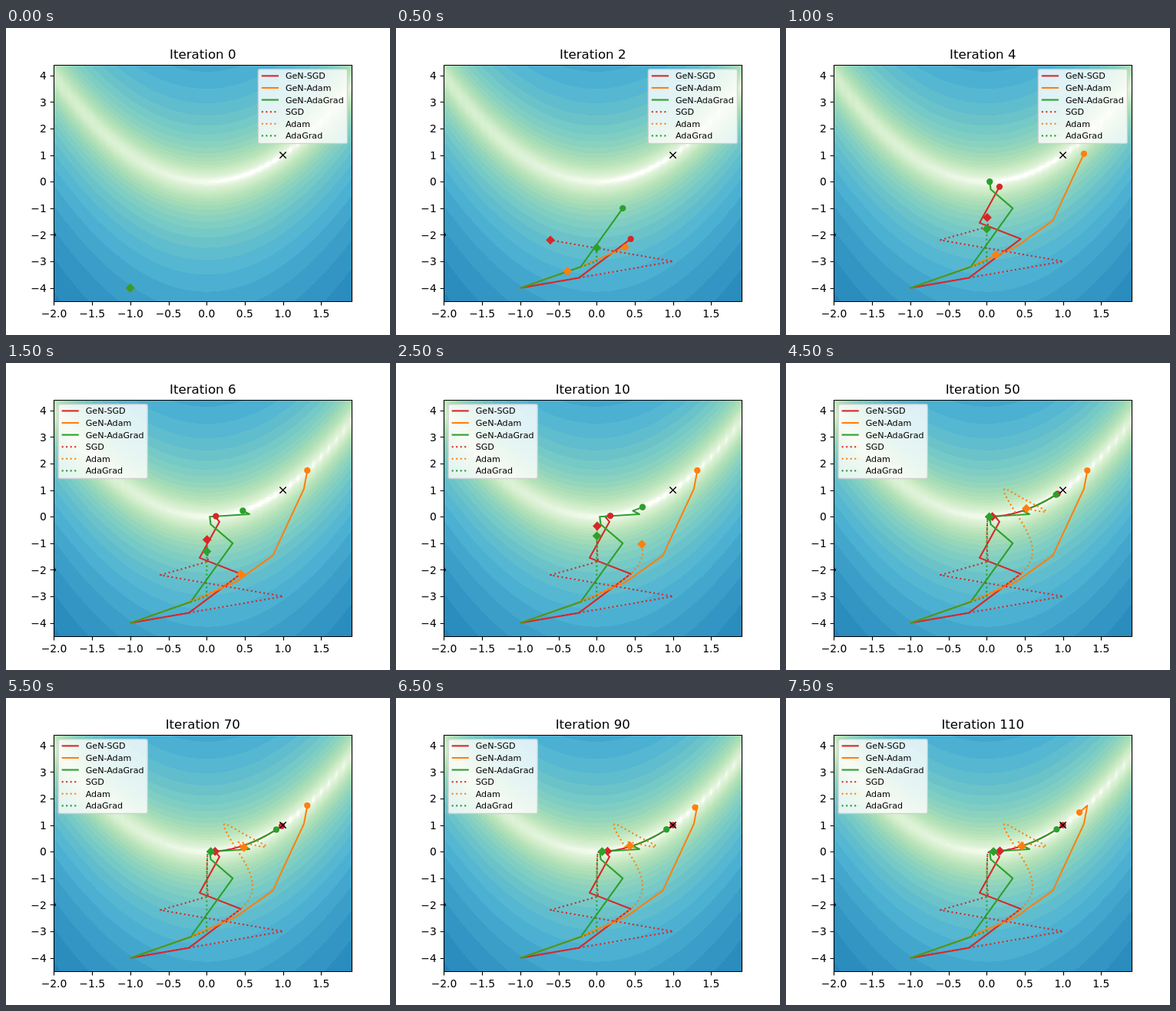
An HTML page with a canvas for the animation above (8 s loop, 500 by 400 pixels).

```html
<!DOCTYPE html>
<html lang="en">
<head>
<meta charset="utf-8">
<title>Optimizer paths</title>
<style>
html, body { margin: 0; width: 100%; height: 100%; overflow: hidden; background: #fff; }
canvas { display: block; }
</style>
</head>
<body>
<canvas id="stage" width="500" height="400"></canvas>
<script>
const RED = '#d62728', ORANGE = '#ff7f0e', GREEN = '#2ca02c';
const LEFT = 62.5, RIGHT = 450, TOP = 48, BOTTOM = 356;
const SX = (RIGHT - LEFT) / 3.9, SY = (BOTTOM - TOP) / 8.9;
const LAST = 110, STEP_MS = 500, STEPS = 16;
const FONT = '"DejaVu Sans", Verdana, sans-serif';

const px = x => LEFT + (x + 2) * SX;
const py = y => BOTTOM - (y + 4.5) * SY;

// Rosenbrock function, its gradient and curvature along p
const loss = (x, y) => (1 - x) ** 2 + 100 * (y - x * x) ** 2;
const grad = ([x, y]) => [-400 * x * (y - x * x) - 2 * (1 - x), 200 * (y - x * x)];
const curvature = ([x, y], [a, b]) =>
  (1200 * x * x - 400 * y + 2) * a * a - 800 * x * a * b + 200 * b * b;

// Each factory returns a function from gradient to update direction
const sgd = () => g => g;
const adagrad = () => {
  const sum = [0, 0];
  return g => g.map((v, i) => v / Math.sqrt(sum[i] += v * v));
};
const adam = () => {
  const m = [0, 0], s = [0, 0];
  let t = 0;
  return g => {
    t++;
    return g.map((v, i) => {
      m[i] = 0.9 * m[i] + 0.1 * v;
      s[i] = 0.999 * s[i] + 0.001 * v * v;
      return m[i] / (1 - 0.9 ** t) / (Math.sqrt(s[i] / (1 - 0.999 ** t)) + 1e-8);
    });
  };
};

// Without a rate, the step length is Newton's along the direction
function descend(direction, steps, rate) {
  const path = [[-1, -4]];
  for (let n = 0; n < steps; n++) {
    const p = path[n], g = grad(p), d = direction(g);
    const r = rate || (g[0] * d[0] + g[1] * d[1]) / curvature(p, d);
    path.push([p[0] - r * d[0], p[1] - r * d[1]]);
  }
  return path;
}

// Continue along the valley y = x², through [iteration, x] keys
function followValley(path, keys) {
  for (const [end, x1] of keys) {
    const start = path.length - 1, x0 = path[start][0];
    for (let n = start + 1; n <= end; n++) {
      const x = x0 + (x1 - x0) * (n - start) / (end - start);
      path.push([x, x * x]);
    }
  }
  return path;
}

const series = [
  { name: 'GeN-SGD', color: RED, path: followValley(descend(sgd(), 6),
    [[10, 0.18], [20, 0.4], [30, 0.62], [40, 0.8], [50, 0.93], [70, 0.985], [90, 1], [LAST, 1]]) },
  { name: 'GeN-Adam', color: ORANGE, path: followValley(descend(adam(), 5),
    [[70, 1.319], [80, 1.308], [90, 1.291], [100, 1.26], [LAST, 1.216]]) },
  { name: 'GeN-AdaGrad', color: GREEN, path: followValley([...descend(adagrad(), 4), [0.561, 0.095]],
    [[6, 0.475], [10, 0.602], [20, 0.8], [30, 0.87], [40, 0.9], [50, 0.91], [LAST, 0.918]]) },
  { name: 'SGD', color: RED, dotted: true, path: descend(sgd(), LAST, 0.001) },
  { name: 'Adam', color: ORANGE, dotted: true, path: descend(adam(), LAST, Math.sqrt(0.1)) },
  { name: 'AdaGrad', color: GREEN, dotted: true, path: descend(adagrad(), LAST, 1) }
];

const ctx = document.getElementById('stage').getContext('2d');

function label(c, text, x, y, size, align) {
  c.font = `${size}px ${FONT}`;
  c.textAlign = align;
  c.fillStyle = '#000';
  c.fillText(text, x, y);
}

// Filled contours on a 0.1 grid, log-spaced levels
function paintContours(c) {
  const ramp = ['f7fcf0', 'e0f3db', 'ccebc5', 'a8ddb5', '7bccc4', '4eb3d3', '2b8cbe', '0868ac', '084081']
    .map(h => [0, 2, 4].map(i => parseInt(h.slice(i, i + 2), 16)));
  const level = i => 10 ** (5 * i / 34);
  const bands = Array.from({ length: 34 }, (_, i) => {
    const t = Math.log10((level(i) + level(i + 1)) / 2) / 5 * 8;
    const k = Math.min(7, Math.floor(t));
    return ramp[k].map((v, j) => v + (ramp[k + 1][j] - v) * (t - k));
  });
  const node = (i, j) => loss(-2 + i / 10, -4.5 + j / 10);
  const w = 388, h = 308, img = c.createImageData(w, h);
  for (let r = 0; r < h; r++) {
    for (let q = 0; q < w; q++) {
      const gx = Math.max(0, (62.5 + q - LEFT) / SX * 10), gy = (BOTTOM - TOP - r - 0.5) / SY * 10;
      const i = Math.min(38, Math.floor(gx)), j = Math.min(88, Math.floor(gy));
      const u = gx - i, v = gy - j;
      const z = (node(i, j) * (1 - u) + node(i + 1, j) * u) * (1 - v) +
                (node(i, j + 1) * (1 - u) + node(i + 1, j + 1) * u) * v;
      const rgb = z < 1 ? [255, 255, 255] : bands[Math.min(33, Math.floor(Math.log10(z) / 5 * 34))];
      img.data.set([...rgb, 255], (r * w + q) * 4);
    }
  }
  c.putImageData(img, 62, 48);
}

function paintAxes(c) {
  const snap = v => Math.floor(v + 0.49) + 0.5;
  const number = (v, digits) => v.toFixed(digits).replace('-', '\u2212');
  c.strokeStyle = '#000';
  c.lineWidth = 1.11;
  c.beginPath();
  c.rect(62.5, 48.5, 388, 308);
  for (let x = -2; x <= 1.5; x += 0.5) {
    c.moveTo(snap(px(x)), 356.5);
    c.lineTo(snap(px(x)), 361.4);
    label(c, number(x, 1), px(x), 377, 13.89, 'center');
  }
  for (let y = -4; y <= 4; y++) {
    c.moveTo(62.5, snap(py(y)));
    c.lineTo(57.6, snap(py(y)));
    label(c, number(y, 0), 52.8, py(y) + 5.2, 13.89, 'right');
  }
  c.stroke();
}

const backdrop = document.createElement('canvas');
backdrop.width = 500;
backdrop.height = 400;
{
  const c = backdrop.getContext('2d');
  c.fillStyle = '#fff';
  c.fillRect(0, 0, 500, 400);
  paintContours(c);
  c.fillStyle = '#000';
  c.beginPath();
  c.arc(LEFT, py(-2), 2.3, -Math.PI / 2, Math.PI / 2);
  c.fill();
  paintAxes(c);
}

function stroke(s, points) {
  ctx.strokeStyle = s.color;
  ctx.lineWidth = 2.08;
  ctx.lineJoin = 'round';
  ctx.setLineDash(s.dotted ? [2.08, 3.44] : []);
  ctx.beginPath();
  for (const [x, y] of points) ctx.lineTo(x, y);
  ctx.stroke();
  ctx.setLineDash([]);
}

function marker(s, [x, y]) {
  const r = s.dotted ? 5.9 : 4.17;
  ctx.fillStyle = s.color;
  ctx.beginPath();
  if (s.dotted) {
    ctx.moveTo(x, y - r);
    ctx.lineTo(x + r, y);
    ctx.lineTo(x, y + r);
    ctx.lineTo(x - r, y);
  } else {
    ctx.arc(x, y, r, 0, 2 * Math.PI);
  }
  ctx.fill();
}

function optimum() {
  const x = px(1), y = py(1), r = 4.17;
  ctx.strokeStyle = '#000';
  ctx.lineWidth = 1.39;
  ctx.beginPath();
  ctx.moveTo(x - r, y - r);
  ctx.lineTo(x + r, y + r);
  ctx.moveTo(x - r, y + r);
  ctx.lineTo(x + r, y - r);
  ctx.stroke();
}

function legend(x) {
  ctx.fillStyle = 'rgba(255,255,255,.8)';
  ctx.strokeStyle = 'rgba(204,204,204,.8)';
  ctx.lineWidth = 1.39;
  ctx.beginPath();
  ctx.roundRect(x, 53.8, 116.2, 96.7, 2.2);
  ctx.fill();
  ctx.stroke();
  series.forEach((s, i) => {
    const y = 62.4 + 15.6 * i;
    stroke(s, [[x + 4.5, y], [x + 26.7, y]]);
    label(ctx, s.name, x + 35.6, y + 3.9, 11.11, 'left');
  });
}

function draw() {
  const step = Math.floor(performance.now() / STEP_MS) % STEPS;
  const n = step <= 5 ? 2 * step : 10 * (step - 4);
  const toPixels = ([x, y]) => [px(x), py(y)];
  ctx.drawImage(backdrop, 0, 0);
  label(ctx, 'Iteration ' + n, 256.25, 40, 16.67, 'center');
  for (const s of series) stroke(s, s.path.slice(0, n + 1).map(toPixels));
  for (const s of series) marker(s, toPixels(s.path[n]));
  optimum();
  legend(n < 6 ? 328.3 : 68.1);
  requestAnimationFrame(draw);
}
draw();
</script>
</body>
</html>
```
